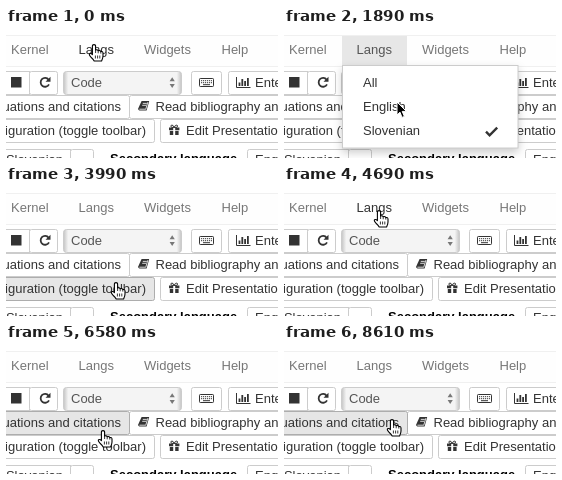
Recreate the animation shown at these times as an HTML page. Size 272x130 px, loop 8.75 s.

```html
<!DOCTYPE html>
<html lang="en">
<head>
<meta charset="utf-8">
<title>Language menu</title>
<style>
  html, body { margin: 0; width: 100%; height: 100%; overflow: hidden; background: #fff; }
  svg { display: block; width: 272px; height: 130px; font: 13px "Liberation Sans", Arial, sans-serif; fill: #333; }
  .nav text { fill: #777; }
  .nav .hover { fill: #333; }
  .nav .active { fill: #555; }
  .btn rect { fill: #fff; stroke: #ccc; }
  .btn.hover rect { fill: #e6e6e6; stroke: #adadad; }
  .line { fill: none; stroke: #333; }
  .check { fill: none; stroke: #333; stroke-width: 2.4; }
  .menu { filter: drop-shadow(0 4px 4px rgba(0, 0, 0, .2)); }
  .off { display: none; }
</style>
</head>
<body>
<svg viewBox="0 0 272 130">
  <defs>
    <linearGradient id="face">
      <stop stop-color="#c4c4c4"/><stop offset=".04" stop-color="#f4f4f4"/>
      <stop offset=".96" stop-color="#f4f4f4"/><stop offset="1" stop-color="#c4c4c4"/>
    </linearGradient>
  </defs>

  <g class="nav">
    <rect x="-5.5" y="7.5" width="290" height="31" fill="#fefefe" stroke="#f0f0f0"/>
    <rect id="tab" x="58" y="8" width="65" height="30" fill="#e7e7e7"/>
    <text x="5" y="26">Kernel</text>
    <text id="langs" x="72.6" y="26">Langs</text>
    <text x="138" y="26">Widgets</text>
    <text x="215.5" y="26">Help</text>
  </g>

  <!-- toolbar -->
  <g class="btn"><rect x="-4.5" y="43.5" width="28" height="23"/><rect x="23.5" y="43.5" width="28" height="23" rx="2"/></g>
  <rect x="5" y="49" width="10.5" height="10.5"/>
  <path class="line" stroke-width="1.8" d="M42.6 51.7A4.4 4.4 0 1 0 43 56.3"/>
  <path d="M44.5 48.7v5h-5z"/>
  <rect x="57.5" y="43.5" width="118" height="23" rx="3" fill="url(#face)" stroke="#ccc"/>
  <text x="65" y="59" fill="#555">Code</text>
  <path fill="#777" d="M163.6 53.2l2.6-4 2.6 4zM163.6 56l2.6 4 2.6-4z"/>
  <g class="btn"><rect x="185.5" y="43.5" width="30" height="23" rx="2"/><rect x="222.5" y="43.5" width="60" height="23" rx="2"/></g>
  <rect class="line" x="193.5" y="50.5" width="14" height="8" rx=".8"/>
  <path class="line" stroke-dasharray="1.2 .8" d="M195 52.7h11M195 54.7h11"/>
  <path class="line" d="M197 56.7h7"/>
  <path class="line" d="M230.5 49v10.5h14"/>
  <path class="line" stroke-width="1.8" d="M233.5 58v-3.6M236.3 58v-7M239.1 58v-5M241.9 58v-8"/>
  <text x="249" y="59">Enter</text>

  <g class="btn"><rect x="123.5" y="67.5" width="170" height="23" rx="2"/></g>
  <g id="cite" class="btn"><rect x="-9.5" y="67.5" width="133" height="23" rx="2"/></g>
  <text x="115" y="83" text-anchor="end">equations and citations</text>
  <path d="M135.6 73h7.6l-2.6 9.6h-7.2q-1.6-.4-1.2-2z"/>
  <path fill="none" stroke="#fff" stroke-width=".8" d="M136.8 75.4h4M136.2 77.3h4M133.4 81.2h6.4l2-7"/>
  <text x="149.5" y="83">Read bibliography and</text>

  <g id="conf" class="btn"><rect x="-9.5" y="91.5" width="158" height="23" rx="2"/></g>
  <g class="btn"><rect x="154.5" y="91.5" width="140" height="23" rx="2"/></g>
  <text x="140" y="107" text-anchor="end">configuration (toggle toolbar)</text>
  <path d="M163 99.6h4.2v2.6H163zM169.2 99.6h4.2v2.6h-4.2zM163.8 103h3.4v4h-3.4zM169.2 103h3.4v4h-3.4z"/>
  <path class="line" d="M168.2 99.4q-1-2.6-2.6-2.4-1.6.8 0 2.4h5.2q1.6-1.6 0-2.4-1.6-.2-2.6 2.4"/>
  <text x="180" y="107">Edit Presentation</text>

  <g class="btn"><rect x="-9.5" y="121.5" width="74" height="23"/><rect x="64.5" y="121.5" width="23" height="23" rx="2"/><rect x="241.5" y="121.5" width="50" height="23" rx="2"/></g>
  <text x="57" y="136" text-anchor="end">Slovenian</text>
  <text x="104" y="135" font-weight="bold" fill="#000">Secondary language</text>
  <text x="249" y="136">English</text>

  <g id="menu" class="menu">
    <rect x="58.5" y="37.5" width="175.5" height="82.5" fill="#fff" stroke="#ccc"/>
    <text x="79" y="59">All</text>
    <text x="79" y="83">English</text>
    <text x="79" y="107">Slovenian</text>
    <path id="en" class="check" d="M202 79.5l3.6 3.6 7.6-7.6"/>
    <path id="sl" class="check" d="M202 103.7l3.6 3.6 7.6-7.6"/>
  </g>

  <g id="cursor">
    <g id="hand">
      <path fill="#fff" stroke="#000" stroke-width="1.1" stroke-linejoin="round"
        d="M-1.6 8V1.2Q-1.6-.4 0-.4T1.6 1.2V5Q3.4 4.3 4.2 5.7 6 5 6.8 6.6 8.8 6 9 8V11Q9 13 7.6 16H.2Q-.8 14-3 12.2-5.4 9.6-4.4 8.8-3.2 8-1.6 9.6Z"/>
      <path fill="none" stroke="#000" stroke-width=".8" d="M1.6 5v3M4.2 5.7v2.6M6.8 6.6v2M1.4 10.5v3M3.6 10.5v3M5.8 10.5v3"/>
    </g>
    <path id="arrow" fill="#000" stroke="#fff" stroke-width="1" d="M0 0V13L3 10.2 5 15.4 7.4 14.4 5.2 9.4H9.4Z"/>
  </g>
</svg>
<script>
  const LOOP = 8750, STEP = 70;
  const el = id => document.getElementById(id);

  const smooth = p => p * p * (3 - 2 * p);
  const speedUp = p => p ** 1.5;
  const slowDown = p => 1 - (1 - p) ** 1.6;

  // time, x, y, easing towards this point
  const path = [
    [0, 88, 17], [140, 87, 24], [770, 87, 24], [1610, 113, 74], [1960, 113, 74],
    [2660, 93, 22], [2730, 93, 22], [3080, 109, 63, speedUp], [3710, 110, 97, slowDown],
    [4130, 110, 97], [4690, 95, 25], [4830, 94, 20, slowDown], [5390, 94, 20],
    [5880, 104, 70, speedUp], [6160, 97, 93, slowDown], [6440, 97, 93],
    [7210, 94, 20], [7420, 94, 20], [8050, 108, 76], [LOOP, 108, 76]
  ];
  const opened = [[350, 1960], [2730, 3990], [4970, 6440], [7490, 8540]];
  const PRESS = 140; // the arrow shows this long before the menu closes

  function position(t) {
    const i = path.findIndex(p => p[0] > t);
    const [t0, x0, y0] = path[i - 1], [t1, x1, y1, ease = smooth] = path[i];
    const k = ease((t - t0) / (t1 - t0));
    return [x0 + (x1 - x0) * k, y0 + (y1 - y0) * k];
  }

  const show = (id, on) => el(id).classList.toggle("off", !on);
  const hover = (id, on) => el(id).classList.toggle("hover", on);

  function draw(now) {
    const t = Math.floor(now % LOOP / STEP) * STEP;
    const [x, y] = position(t);
    const open = opened.some(([a, b]) => t >= a && t < b);
    const pressed = opened.some(([, b]) => t >= b - PRESS && t < b);
    const arrow = pressed || (!open && y > 38 && y < 67);

    show("tab", open);
    show("menu", open);
    show("en", t >= 1960 && t < 8540);
    show("sl", t < 3990 || t >= 6440);
    show("hand", !arrow);
    show("arrow", arrow);
    el("langs").classList.toggle("active", open);
    hover("langs", !open && y < 38);
    hover("cite", !open && y >= 67 && y < 91);
    hover("conf", !open && y >= 91);
    el("cursor").setAttribute("transform", `translate(${Math.round(x)} ${Math.round(y)})`);
  }

  const start = performance.now();
  function tick() {
    draw(performance.now() - start);
    requestAnimationFrame(tick);
  }
  tick();
</script>
</body>
</html>
```
